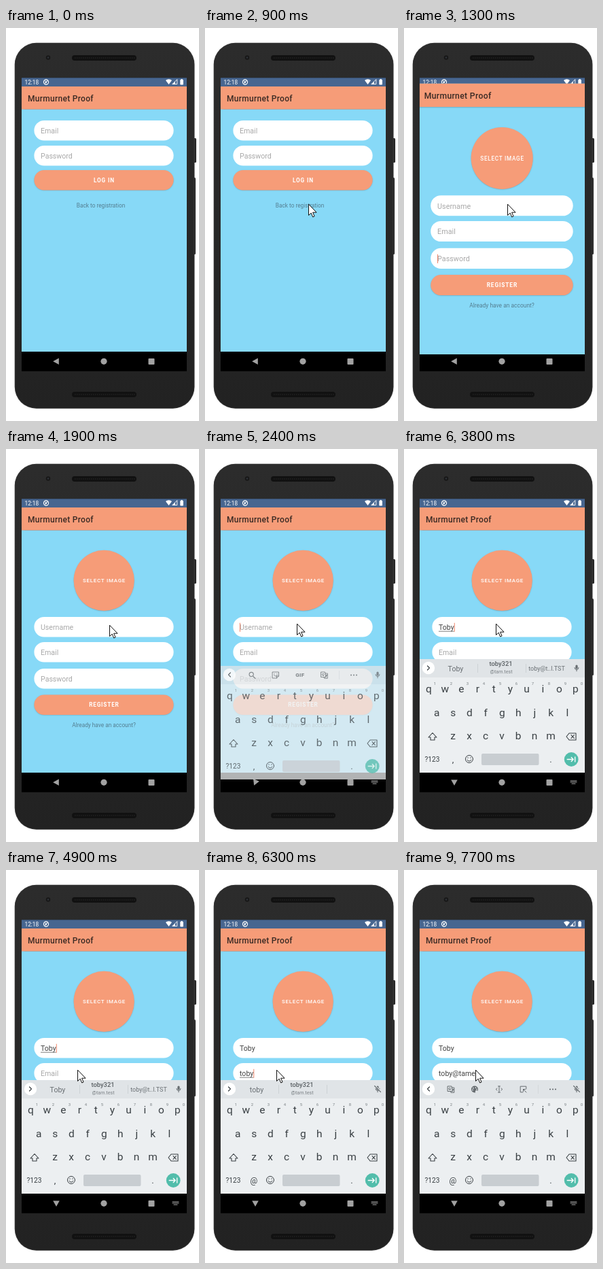
Recreate the animation shown at these times as an HTML page with a canvas. Size 284x578 px, loop 8 s.

```html
<!DOCTYPE html>
<html lang="en">
<head>
<meta charset="utf-8">
<title>Sign-up demo</title>
<style>
html, body { margin: 0; width: 100%; height: 100%; overflow: hidden; background: #fff; }
canvas { display: block; width: 284px; height: 578px; }
</style>
</head>
<body>
<canvas></canvas>
<script>
const canvas = document.querySelector('canvas');
const ctx = canvas.getContext('2d');
const ratio = window.devicePixelRatio || 1;
canvas.width = 284 * ratio;
canvas.height = 578 * ratio;

const LOOP = 8000, STEP = 100;
const SKY = '#87d9f7', SALMON = '#f69c78', INK = '#3a4044', GREY = '#666c70', LINK = '#557f91';
const NAME = 'Toby', MAIL = 'toby@tamel';
const NAME_KEYS = [3300, 3500, 3700, 3800];
const MAIL_KEYS = [5700, 5900, 6000, 6200, 6700, 6800, 6900, 7000, 7100, 7200];
const SHOW_FORM = 1170, FOCUS_NAME = 2300, FOCUS_MAIL = 5200;
const CARET_RESETS = [1200, FOCUS_NAME, ...NAME_KEYS, FOCUS_MAIL, ...MAIL_KEYS];
// time, x, y of the pointer tip
const POINTER = [[100, 200, 533], [900, 152, 259], [1900, 152, 259], [2200, 135, 257],
  [4200, 135, 257], [4700, 105, 294], [LOOP, 105, 294]];

const ICONS = {
  search: 'M1.5 1.5L5 5M2.3-1A3.1 3.1 0 1 1-3.9-1A3.1 3.1 0 1 1 2.3-1',
  sticker: 'M-4.5-4.5H4.5V1.5L1.5 4.5H-4.5ZM4.5 1.5H1.5V4.5M-2.2 0A2.3 2.3 0 0 0 2.2 0M-2-2V-1.5M2-2V-1.5',
  translate: 'M-4.5-4.5H1L2.5 3H-4.5ZM1.5-2.5H4.8V4.8H0L-.5 3M-.3-1.5A1.5 1.5 0 1 0-.3 0H-1.5M2.5 0H4.5M3.5 0L2.7 2.5',
  textCursor: 'M0-4.5V4.5M-1.5-4.5H1.5M-1.5 4.5H1.5M-3-1.5L-4.8 0L-3 1.5M3-1.5L4.8 0L3 1.5',
  edit: 'M4.3-.5V-4.3H-4.3V4.3H-.5M0 0L4.5 4.5M0 0H3M0 0V3',
  micStand: 'M-3-.5A3 3 0 0 0 3-.5M0 2.5V4.8',
  slash: 'M-4.5-4.5L4.5 4.5',
  shift: 'M0-5.5L6 1H3V5H-3V1H-6Z',
  erase: 'M-7 0L-3-5H7V5H-3ZM0-2.3L4.3 2.3M4.3-2.3L0 2.3',
  smiley: 'M5.5 0A5.5 5.5 0 1 1-5.5 0A5.5 5.5 0 1 1 5.5 0M-2.8 1.2A3 3 0 0 0 2.8 1.2M-2-2.2V-1.5M2-2.2V-1.5',
  next: 'M-6 0H3M0-3L3 0L0 3M5.5-3.5V3.5',
  keyboard: 'M-4.5-2H4.5M-4.5 0H4.5M-2.5 2.2H2.5'
};

const clamp = v => Math.max(0, Math.min(1, v));
const typed = (word, keys, t) => word.slice(0, keys.filter(k => k <= t).length);

function box(x, y, w, h, r, fill) {
  ctx.fillStyle = fill;
  ctx.beginPath();
  ctx.roundRect(x, y, w, h, r);
  ctx.fill();
}

const disc = (x, y, r, fill) => box(x - r, y - r, 2 * r, 2 * r, r, fill);

function text(str, x, y, size, color, { align = 'center', weight = 400, spacing = 0 } = {}) {
  ctx.font = `${weight} ${size}px Roboto, sans-serif`;
  ctx.letterSpacing = spacing + 'px';
  ctx.textAlign = align;
  ctx.fillStyle = color;
  ctx.fillText(str, x, y + size * 0.36);
  return ctx.measureText(str).width;
}

function icon(path, x, y, color = GREY, width = 1, fill = null) {
  const shape = new Path2D(path);
  ctx.save();
  ctx.translate(x, y);
  ctx.lineWidth = width;
  ctx.lineCap = ctx.lineJoin = 'round';
  if (fill) { ctx.fillStyle = fill; ctx.fill(shape); }
  if (width) { ctx.strokeStyle = color; ctx.stroke(shape); }
  ctx.restore();
}

function withShadow(draw) {
  ctx.save();
  ctx.shadowColor = 'rgba(0,0,0,.2)';
  ctx.shadowBlur = 1.5 * ratio;
  ctx.shadowOffsetY = 0.6 * ratio;
  draw();
  ctx.restore();
}

function phone() {
  box(275, 162, 5, 36, 1.5, '#2a2a2a');
  box(275, 220, 4, 113, 1.5, '#2a2a2a');
  const shell = ctx.createLinearGradient(0, 22, 0, 560);
  shell.addColorStop(0, '#2c2c2c');
  shell.addColorStop(1, '#222');
  box(12.7, 21.8, 264.8, 538, 32, '#383838');
  box(13.6, 22.7, 263, 536.2, 31, shell);
  disc(62, 43.5, 3.2, '#171717');
  disc(62, 43.5, 1.3, '#30343a');
  for (const y of [40, 535]) {
    box(97, y, 95, 8, 4, '#111');
    for (let x = 101; x < 190; x += 3) box(x, y + 3, 1.5, 2, 0, '#1e1e1e');
  }
}

function statusBar() {
  box(23, 73, 243, 14, 0, '#476690');
  text('12:18', 27.5, 79.8, 8.3, '#fff', { align: 'left' });
  icon('M3.6 0A3.6 3.6 0 1 1-3.6 0A3.6 3.6 0 1 1 3.6 0M-1.5 1.5L1.8-1.6M-1.5-1.5L.5 1', 59, 79.5, '#fff', 1.1);
  icon('M-4.5-2A6.5 6.5 0 0 1 4.5-2L0 4Z', 239.5, 79, '#fff', 0, '#fff');
  icon('M3.3-3.3V3.3H-3.3Z', 248.5, 79.3, '#fff', 0.9);
  icon('M.5-.5V3.3H-3.3Z', 248.5, 79.3, '#fff', 0, '#fff');
  box(256.3, 76, 4.6, 7.5, 0.8, '#fff');
  box(257.5, 75, 2.2, 2, 0, '#fff');
}

function field(y, hint, value = '', caret = false, underline = false) {
  box(41.4, y, 205.2, 29.6, 14.8, '#fff');
  const mid = y + 15.3, style = { align: 'left' };
  const width = value ? text(value, 51, mid, 10.6, '#444', style) : 0;
  if (!value) text(hint, 51, mid, 10.6, '#a8a8a8', style);
  if (underline && value) box(51, mid + 5.5, width, 0.8, 0, '#555');
  if (caret) box(51 + width, mid - 6.5, 1, 13, 0, '#f08468');
}

function button(y, label) {
  withShadow(() => box(41.4, y, 205.2, 29.5, 14.8, SALMON));
  text(label, 144.4, y + 15, 8.2, '#fff', { weight: 700, spacing: 0.85 });
}

function appWindow(t) {
  const form = t >= SHOW_FORM;
  const rest = form ? (1 - clamp((t - SHOW_FORM) / 400)) ** 4 : 0;
  const scale = 1 + 0.1 * rest;
  ctx.save();
  ctx.translate(144.5, 289);
  ctx.scale(scale, scale);
  ctx.translate(-144.5, -289);
  box(23, 86, 243, 390, 0, SKY);
  withShadow(() => box(23, 86, 243, 33.6, 0, SALMON));
  text('Murmurnet Proof', 32, 103.8, 12, '#3a2a24', { align: 'left', weight: 500, spacing: 0.3 });
  if (form) signUp(t);
  else {
    field(136, 'Email');
    field(173, 'Password');
    button(209, 'LOG IN');
    text('Back to registration', 139.6, 261, 8.28, LINK);
  }
  ctx.restore();
}

function signUp(t) {
  const lastReset = Math.max(...CARET_RESETS.filter(k => k <= t), SHOW_FORM);
  const lit = (t - lastReset) % 1000 < 500;
  const onName = t >= FOCUS_NAME && t < FOCUS_MAIL, onMail = t >= FOCUS_MAIL;
  withShadow(() => disc(144.2, 193.4, 44.6, SALMON));
  text('SELECT IMAGE', 144.5, 193.6, 8, '#fff', { weight: 500, spacing: 0.7 });
  field(247, 'Username', typed(NAME, NAME_KEYS, t), lit && onName, onName);
  field(284, 'Email', typed(MAIL, MAIL_KEYS, t), lit && onMail, t < 6700);
  field(323, 'Password', '', lit && !onName && !onMail);
  button(361.5, 'REGISTER');
  text('Already have an account?', 144, 406, 8.28, LINK);
}

function navBar(turn) {
  ctx.save();
  ctx.translate(74, 490.3);
  ctx.rotate(-Math.PI / 2 * turn);
  icon('M-4.8 0L3.8-4.8V4.8Z', 0, 0, '', 0, '#a2a2a2');
  ctx.restore();
  disc(144, 490.3, 4.6, '#a2a2a2');
  box(209.5, 486, 9, 9, 1, '#a2a2a2');
  if (turn > 0.5) icon(ICONS.keyboard, 249.5, 490, '#a2a2a2', 1.1);
}

function suggestions(word, t) {
  text(word, 76, 323, 10.6, '#6a7074');
  box(108, 316, 0.7, 13, 0, '#c5cacd');
  box(179, 316, 0.7, 13, 0, '#c5cacd');
  text('toby321', 142.5, 316, 9.4, '#5a6064', { weight: 500 });
  text('@tam.test', 143, 327.3, 7.2, '#7d8387');
  if (t < FOCUS_MAIL) text('toby@t..l.TST', 210, 323, 9, '#6a7074');
}

function toolbar(t) {
  const word = t < FOCUS_MAIL ? typed(NAME, NAME_KEYS, t) : t < 6700 ? typed(MAIL, MAIL_KEYS, t) : '';
  const email = t >= FOCUS_MAIL;
  disc(36, 322, 9.2, '#fff');
  icon(word ? 'M-1.5-3L1.5 0L-1.5 3' : 'M1.5-3L-1.5 0L1.5 3', 36, 322, INK, 1.2);
  if (word) suggestions(word, t);
  else {
    if (email) {
      icon(ICONS.translate, 69, 322.5);
      disc(104, 322.5, 5, GREY);
      for (const a of [2.9, 3.9, 5.2, 6.2]) disc(104 + 3 * Math.cos(a), 322.8 + 3 * Math.sin(a), 0.9, '#e0e4e7');
      disc(106.8, 326, 2, '#e0e4e7');
      icon(ICONS.textCursor, 140, 322.5);
      icon(ICONS.edit, 175.5, 322.5);
    } else {
      icon(ICONS.search, 69, 322.5, GREY, 1.2);
      icon(ICONS.sticker, 104, 322.5);
      text('GIF', 139.8, 322.5, 8, GREY, { weight: 900, spacing: 0.3 });
      icon(ICONS.translate, 175.5, 322.5);
    }
    box(197, 316, 0.6, 13, 0, '#ccd1d4');
    for (const x of [215, 219, 223]) disc(x, 322.5, 1.1, GREY);
  }
  icon('M0-3V0', 254, 322, GREY, 3.2);
  icon(ICONS.micStand, 254, 322);
  if (email) {
    icon(ICONS.slash, 254.8, 321.5, '#e0e4e7', 1.3);
    icon(ICONS.slash, 254, 322, GREY, 1.1);
  }
}

function keyRow(keys, x, y, digits) {
  [...keys].forEach((key, i) => {
    text(key, x + 24 * i, y, 15.5, INK);
    if (digits) text((i + 1) % 10, x + 24 * i + 9, 344.5, 6, '#7a8084');
  });
}

function keyboard(t, shown) {
  ctx.save();
  ctx.globalAlpha = shown;
  ctx.translate(0, 40 * (1 - shown));
  box(23, 309, 243, 27, 0, '#e0e4e7');
  box(23, 336, 243, 140, 0, '#eceff1');
  toolbar(t);
  keyRow('qwertyuiop', 36.4, 352, true);
  keyRow('asdfghjkl', 48.3, 387);
  keyRow('zxcvbnm', 72, 421.5);
  icon(ICONS.shift, 42, 423, INK, 1.1);
  icon(ICONS.erase, 246, 423, INK, 1.1);
  text('?123', 41.5, 456.5, 10.2, INK);
  text(t < FOCUS_MAIL ? ',' : '@', 72, 456.5, t < FOCUS_MAIL ? 13 : 12, INK);
  icon(ICONS.smiley, 96, 456, INK, 1);
  box(114, 448, 84.5, 17, 2, '#c8cdd1');
  text('.', 216, 456.5, 13, INK);
  disc(246.2, 456.5, 10.4, '#52bdab');
  icon(ICONS.next, 246.2, 456.5, '#fff', 1.3);
  ctx.restore();
}

function pointer(t) {
  if (t < POINTER[0][0]) return;
  const i = POINTER.findIndex(p => p[0] > t);
  const [t0, x0, y0] = POINTER[i - 1], [t1, x1, y1] = POINTER[i];
  const u = (t - t0) / (t1 - t0), k = u * u * (3 - 2 * u);
  icon('M0 0V16L3.7 12.6L6.2 18.5L8.6 17.4L6.1 11.7H11.2Z',
    x0 + (x1 - x0) * k + 0.5, y0 + (y1 - y0) * k + 0.5, '#111', 1, '#fff');
}

function draw(now) {
  const t = Math.floor(now % LOOP / STEP) * STEP;
  const shown = 1 - (1 - clamp((t - 2250) / 300)) ** 2;
  ctx.setTransform(ratio, 0, 0, ratio, 0, 0);
  ctx.clearRect(0, 0, 284, 578);
  phone();
  ctx.save();
  ctx.beginPath();
  ctx.rect(23, 73.3, 243, 431.4);
  ctx.clip();
  box(23, 73, 243, 432, 0, '#000');
  statusBar();
  appWindow(t);
  navBar(shown);
  if (shown) keyboard(t, shown);
  ctx.restore();
  pointer(t);
}

const start = performance.now();
(function tick() {
  draw(performance.now() - start);
  requestAnimationFrame(tick);
})();
</script>
</body>
</html>
```
